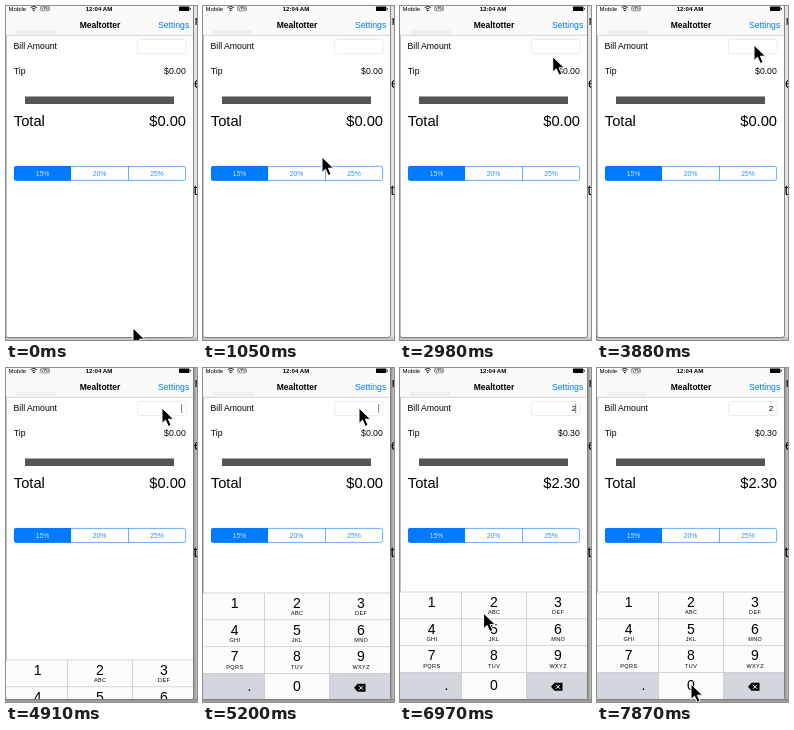
Write an HTML page that moves like this. It is 191 px wide and 334 px high and loops after 8000 ms.

```html
<!DOCTYPE html>
<html lang="en">
<head>
<meta charset="utf-8">
<title>Tip calculator</title>
<style>
  html, body { margin: 0; width: 100%; height: 100%; overflow: hidden; background: #e4e4e4; }
  svg { display: block; width: 191px; height: 334px; }
  text { font-family: "Liberation Sans", Arial, sans-serif; font-size: 8.7px; fill: #000; }
  .end { text-anchor: end; }
  .mid { text-anchor: middle; }
  .bold { font-weight: bold; font-size: 8.5px; }
  .status { font-size: 6px; }
  .total { font-size: 14.7px; }
  .seg { font-size: 6.8px; fill: #2b8fff; text-anchor: middle; }
  .digit { font-size: 14px; text-anchor: middle; }
  .letters { font-size: 5.5px; letter-spacing: .4px; text-anchor: middle; }
  .blue { fill: #007aff; }
</style>
</head>
<body>
<svg viewBox="0 0 191 334">
  <defs>
    <linearGradient id="side">
      <stop offset="0" stop-color="#858585"/><stop offset="1" stop-color="#c4c4c4"/>
    </linearGradient>
    <linearGradient id="under" x2="0" y2="1">
      <stop offset="0" stop-color="#858585"/><stop offset="1" stop-color="#a8a8a8"/>
    </linearGradient>
    <clipPath id="screen"><path d="M0 0H187V329Q187 331 185 331H2Q0 331 0 329Z"/></clipPath>
  </defs>

  <!-- desktop behind the window -->
  <rect width="191" height="334" fill="#e4e4e4"/>
  <rect y="331" width="191" height="3" fill="#c4c4c4"/>
  <g id="shadow" visibility="hidden">
    <rect x="187" width="4" height="334" fill="url(#side)"/>
    <rect y="331" width="191" height="3" fill="url(#under)"/>
  </g>
  <text x="188.7" y="19" style="font-size:12px">r</text>
  <text x="188" y="82" style="font-size:14px">e</text>
  <text x="187.5" y="189" style="font-size:14px">t</text>
  <path d="M0 0H187.5V329Q187.5 331.5 185 331.5H2Q0 331.5 0 329Z" fill="#fefefe" stroke="#777" stroke-width=".9"/>

  <g clip-path="url(#screen)">
    <rect width="187" height="29" fill="#fafafa"/>
    <rect x="10" y="24" width="40" height="4" fill="#efefef"/>
    <path d="M0 29.3H187" stroke="#c4c4c4" stroke-width=".7"/>

    <text class="status" x="2.5" y="5">Mobile</text>
    <g fill="none" stroke="#000" stroke-width=".9">
      <path d="M24.6 1.6Q27.7-1 30.8 1.6M25.9 3.2Q27.7 1.6 29.5 3.2"/>
      <rect x="34.5" y=".4" width="9" height="4.4" rx="1" stroke="#555" stroke-width=".6"/>
    </g>
    <circle cx="27.7" cy="4.5" r=".8"/>
    <text class="mid" x="39" y="4" style="font-size:3.7px">VPN</text>
    <text class="mid bold" x="93" y="5" style="font-size:6.1px">12:04 AM</text>
    <rect x="173" y=".6" width="10.4" height="4.4" rx=".7"/>
    <rect x="184" y="2" width=".8" height="1.6"/>

    <text class="mid bold" x="94" y="21.5">Mealtotter</text>
    <text class="end blue" x="183.3" y="21.5">Settings</text>

    <text x="7.5" y="43">Bill Amount</text>
    <rect x="131.5" y="33.5" width="48.5" height="14" rx="2" fill="#fff" stroke="#ececec"/>
    <text id="bill" class="end" x="176.3" y="43.3" style="font-size:8px"></text>
    <rect id="caret" x="175.2" y="36" width="1" height="9" fill="#737fa8" visibility="hidden"/>
    <text x="7.8" y="68">Tip</text>
    <text id="tip" class="end" x="179.8" y="68">$0.00</text>
    <rect x="19" y="90.5" width="149" height="7.5" fill="#555"/>
    <text class="total" x="7.8" y="120">Total</text>
    <text id="total" class="end total" x="180" y="120">$0.00</text>

    <rect x="8.4" y="160.4" width="171.2" height="14" rx="2" fill="#fff" stroke="#3d9bff" stroke-width=".8"/>
    <path d="M65 160H10Q8 160 8 162V172.8Q8 174.8 10 174.8H65Z" class="blue"/>
    <path d="M122.5 160V174.8" stroke="#3d9bff" stroke-width=".8"/>
    <text class="seg" x="36.5" y="170" style="fill:#cfe5ff">15%</text>
    <text class="seg" x="93.5" y="170">20%</text>
    <text class="seg" x="151" y="170">25%</text>

    <g id="pad" visibility="hidden"></g>
  </g>

  <path id="pointer" d="M0 0V15.4L3.5 12.2 6.3 18.4 9.1 17.2 6.4 11.2H11.6Z" fill="#000" stroke="#fff" stroke-width="1" stroke-linejoin="round"/>
</svg>

<script>
const LOOP = 8000;
const $ = id => document.getElementById(id);

function add(parent, tag, attrs, label) {
  const el = document.createElementNS("http://www.w3.org/2000/svg", tag);
  for (const k in attrs) el.setAttribute(k, attrs[k]);
  if (label) el.textContent = label;
  parent.append(el);
}

function buildPad() {
  const pad = $("pad"), cx = [31.7, 94, 158];
  const letters = ["", "ABC", "DEF", "GHI", "JKL", "MNO", "PQRS", "TUV", "WXYZ"];
  add(pad, "rect", { y: 224, width: 187, height: 107, fill: "#fcfcfc" });
  add(pad, "rect", { y: 304.5, width: 61.5, height: 27, fill: "#d3d6dc" });
  add(pad, "rect", { x: 126.5, y: 304.5, width: 61, height: 27, fill: "#d3d6dc" });
  add(pad, "path", {
    d: "M0 224H187M0 250.7H187M0 277.6H187M0 304.5H187M61.5 224V331M126.5 224V331",
    stroke: "#c3c5c9", "stroke-width": .7
  });
  letters.forEach((word, i) => {
    const x = cx[i % 3], y = 224 + 26.8 * Math.floor(i / 3);
    add(pad, "text", { class: "digit", x, y: y + 14.7 }, i + 1);
    add(pad, "text", { class: "letters", x: x + .2, y: y + 22.3 }, word);
  });
  add(pad, "text", { class: "digit", x: 94, y: 322.3 }, "0");
  add(pad, "text", { class: "digit", x: 46.5, y: 322 }, ".");
  add(pad, "path", { d: "M151 318.8L154.5 314.8H162.5V322.8H154.5Z" });
  add(pad, "path", { d: "M156 316.8L160 320.8M160 316.8L156 320.8", stroke: "#fff", "stroke-width": 1 });
}

// pointer moves: first step, last step, step count, end x, end y, easing power
const moves = [
  [300, 600, 3, 118, 199, .8],
  [900, 1050, 2, 119, 151, 1.2],
  [1200, 1650, 4, 124, 93, .7],
  [1950, 2240, 3, 141, 42, 1],
  [2390, 2680, 3, 149, 61, 1],
  [2980, 3280, 3, 158, 36, .8],
  [3580, 3880, 3, 157, 39, 1],
  [4470, 4470, 1, 156, 40, 1],
  [5350, 5950, 5, 57, 205, 1],
  [6090, 6380, 3, 81, 227, .8],
  [6830, 7120, 3, 88, 276, .9],
  [7420, 7870, 4, 94, 316, .8]
];

function pointerAt(t) {
  let x = 127, y = 322;
  for (const [from, to, n, ex, ey, pow] of moves) {
    if (t < from) break;
    const gap = (to - from) / (n - 1 || 1) || 1;
    const done = Math.min(n, Math.floor((t - from) / gap + .01) + 1);
    const p = (done / n) ** pow;
    x += (ex - x) * p;
    y += (ey - y) * p;
  }
  return [x, y];
}

const show = (id, on) => $(id).setAttribute("visibility", on ? "visible" : "hidden");

function draw(t) {
  const [x, y] = pointerAt(t);
  $("pointer").setAttribute("transform", `translate(${x} ${y})`);

  show("shadow", t >= 4470);
  show("caret", (t >= 4910 && t < 5500) || (t >= 5950 && t < 7420));

  const drop = t < 5060 ? 68 : t < 5200 ? 16 : t < 5350 ? 1 : 0;
  show("pad", t >= 4910);
  $("pad").setAttribute("transform", `translate(0 ${drop})`);

  const bill = t >= 6680 ? 2 : 0, tip = bill * .15;
  $("bill").textContent = bill || "";
  $("tip").textContent = "$" + tip.toFixed(2);
  $("total").textContent = "$" + (bill + tip).toFixed(2);
}

buildPad();
const start = performance.now();
function tick() {
  draw((performance.now() - start) % LOOP);
  requestAnimationFrame(tick);
}
tick();
</script>
</body>
</html>
```
